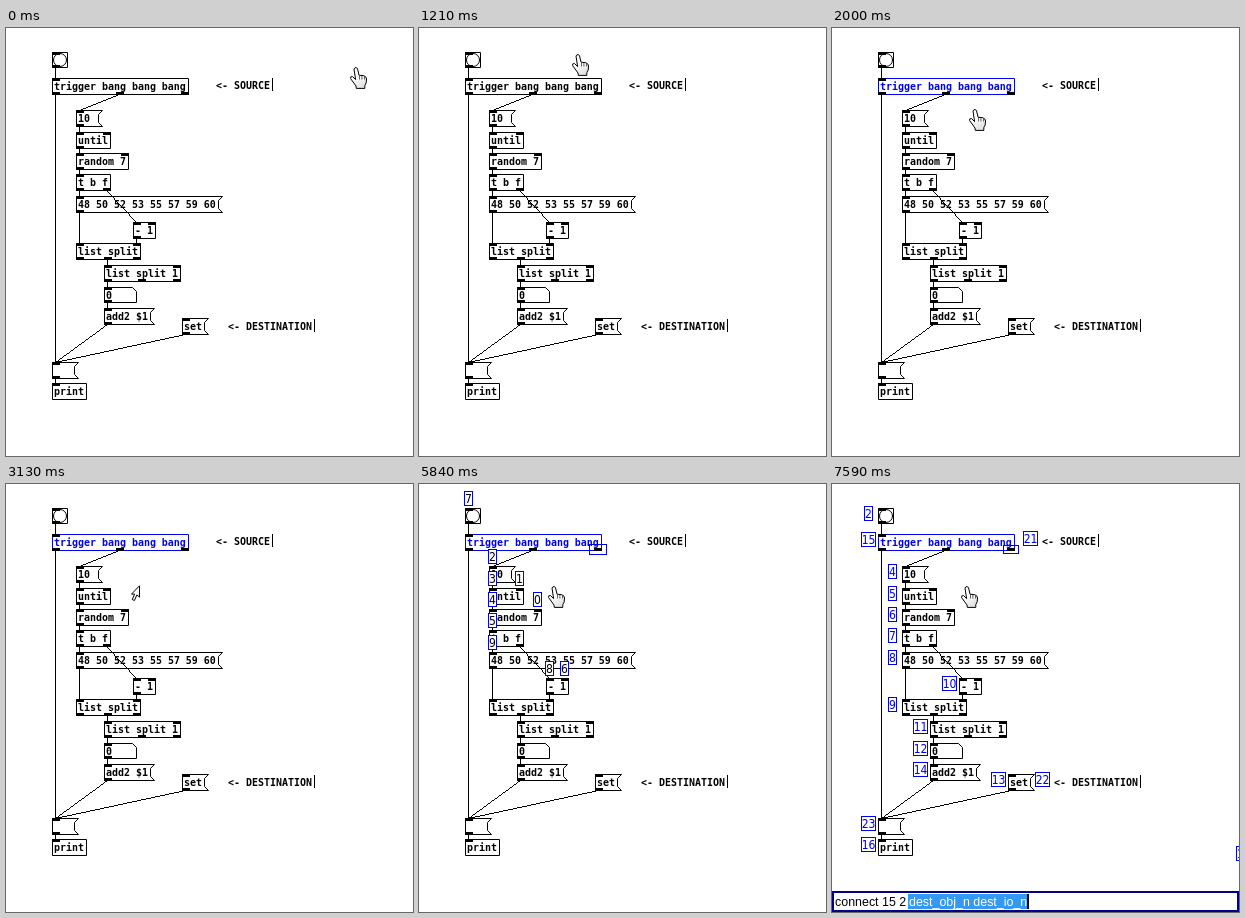
These frames come from a looping animation (407x428 px, 8 s). An HTML page with a canvas:

```html
<!DOCTYPE html>
<html lang="en">
<head>
<meta charset="utf-8">
<title>Patch editor</title>
<style>
html, body { margin: 0; width: 407px; height: 428px; overflow: hidden; background: #fff; }
canvas { display: block; }
</style>
</head>
<body>
<canvas id="stage" width="407" height="428"></canvas>
<script>
const ctx = document.getElementById('stage').getContext('2d');
const LOOP = 8000;
const BLUE = '#0000f0';
const MONO = 'bold 9.967px "DejaVu Sans Mono", monospace';
const TAG = '12px "DejaVu Sans Condensed", "Open Sans", sans-serif';
const BAR = '12.45px "Liberation Sans", Arial, sans-serif';

const boxes = {};
const wires = [];
const comments = [];

// The last character tells the kind: "(" message, "]" number, "@" button.
function makeBox(id, x, y, label) {
  const kind = { '(': 'msg', ']': 'num', '@': 'bang' }[label.slice(-1)] || 'obj';
  const text = kind === 'obj' ? label : label.slice(0, -1);
  const w = {
    bang: 15, num: 32,
    obj: 6 * text.length + 4,
    msg: 6 * Math.max(text.length, 3) + 8
  }[kind];
  const h = kind === 'bang' || kind === 'num' ? 15 : 16;
  const words = text.split(' ');
  const outs = { trigger: words.length - 1, t: words.length - 1, list: 3, print: 0 }[words[0]];
  const ins = ['until', 'random', '-', 'list'].includes(words[0]) ? 2 : 1;
  boxes[id] = { id, kind, text, x, y, w, h, ins, outs: outs === undefined ? 1 : outs };
}

function stack(id, x, y, step, ...labels) {
  labels.forEach((label, i) => makeBox(id + i, x, Math.round(y + i * step), label));
}

function wire(from, outlet, to, inlet) {
  wires.push([boxes[from], outlet, boxes[to], inlet]);
}

function chain(...ids) {
  ids.slice(1).forEach((id, i) => wire(ids[i], 0, id, 0));
}

stack(2, 46, 24, 0, '@');
stack(4, 70, 82.1, 21.45, '10(', 'until', 'random 7', 't b f', '48 50 52 53 55 57 59 60(');
stack(9, 70, 215, 0, 'list split');
stack(10, 127, 194, 0, '- 1');
stack(11, 98, 237, 21.6, 'list split 1', '0]');
stack(13, 176, 290, 0, 'set(');
stack(14, 98, 280, 0, 'add2 $1(');
stack(15, 46, 50, 0, 'trigger bang bang bang');
stack(16, 46, 355, 0, 'print');
stack(23, 46, 334, 0, '(');
comments.push({ id: 21, x: 210, y: 61, text: '<- SOURCE' });
comments.push({ id: 22, x: 222, y: 302, text: '<- DESTINATION' });

chain(2, 15, 23, 16);
chain(4, 5, 6, 7, 8, 9);
chain(11, 12, 14, 23);
chain(13, 23);
wire(15, 1, 4, 0);
wire(7, 1, 10, 0);
wire(10, 0, 9, 1);
wire(9, 1, 11, 0);

const all = Object.values(boxes);
const trigger = boxes[15];

// time, x, y of the pointer's top left corner
const path = [
  [460, 344, 39], [790, 226, 22], [1205, 153, 26], [1290, 135, 29],
  [1600, 136, 53], [1750, 136, 54], [2000, 137, 81]
];

const between = (t, a, b) => t >= a && t < b;

function portX(box, i, count) {
  return box.x + (count > 1 ? Math.floor((box.w - 7) * i / (count - 1)) : 0);
}

function poly(points, fill, stroke) {
  ctx.beginPath();
  points.forEach(([x, y]) => ctx.lineTo(x, y));
  ctx.closePath();
  ctx.fillStyle = fill;
  ctx.fill();
  ctx.strokeStyle = stroke;
  ctx.stroke();
}

// Hard-edged line, one pixel wide
function crispLine(x1, y1, x2, y2) {
  const n = Math.max(Math.abs(x2 - x1), Math.abs(y2 - y1));
  for (let i = 0; i <= n; i++) {
    ctx.fillRect(Math.round(x1 + (x2 - x1) * i / n), Math.round(y1 + (y2 - y1) * i / n), 1, 1);
  }
}

function write(text, x, y, font, color) {
  ctx.font = font;
  ctx.fillStyle = color;
  ctx.fillText(text, x, y);
}

function drawBox(box, color) {
  const l = box.x + 0.5, t = box.y + 0.5, r = l + box.w, b = t + box.h;
  const shapes = {
    msg: [[l, t], [r, t], [r - 4, t + 4], [r - 4, b - 4], [r, b], [l, b]],
    num: [[l, t], [r - 4, t], [r, t + 4], [r, b], [l, b]]
  };
  poly(shapes[box.kind] || [[l, t], [r, t], [r, b], [l, b]], '#fff', color);
  if (box.kind === 'bang') {
    ctx.beginPath();
    ctx.arc(l + 7.5, t + 7.5, 6.5, 0, Math.PI * 2);
    ctx.stroke();
  }
  write(box.text, box.x + 2, box.y + 12, MONO, color);
  ctx.fillStyle = '#000';
  for (let i = 0; i < box.ins; i++) ctx.fillRect(portX(box, i, box.ins), box.y, 8, 3);
  for (let i = 0; i < box.outs; i++) ctx.fillRect(portX(box, i, box.outs), box.y + box.h - 2, 8, 3);
}

function drawComment({ text, x, y }) {
  write(text, x, y, MONO, '#000');
  ctx.fillRect(x + text.length * 6 + 2, y - 11, 1, 13);
}

function drawWire([from, o, to, i]) {
  crispLine(portX(from, o, from.outs) + 3, from.y + from.h, portX(to, i, to.ins) + 3, to.y);
}

function drawTag(n, cx, cy, color) {
  const w = n > 9 ? 14 : 8;
  ctx.fillStyle = '#fff';
  ctx.strokeStyle = BLUE;
  ctx.fillRect(cx - w / 2, cy - 7, w, 14);
  ctx.strokeRect(cx - w / 2, cy - 7, w, 14);
  ctx.textAlign = 'center';
  write(n, cx, cy + 4.5, TAG, color);
  ctx.textAlign = 'left';
}

function drawOutletMark(t) {
  if (t < 3250) return;
  const i = t < 3960 ? 0 : t < 4460 ? 1 : 2;
  const grow = between(t, 5460, 6630) ? 1 : 0;
  ctx.strokeStyle = BLUE;
  ctx.strokeRect(portX(trigger, i, 3) - 3.5 - grow, 61.5 - grow, 15 + 2 * grow, 8 + 2 * grow);
}

function drawInletTags() {
  const digits = [...'7231405986'];
  all.filter(b => b.y < 200 && b !== trigger).forEach(b => {
    for (let i = 0; i < b.ins; i++) {
      drawTag(digits.shift(), portX(b, i, b.ins) + 3.5, b.y - 9.5, '#000');
    }
  });
}

function drawBoxTags() {
  all.forEach(b => drawTag(b.id, b.x - 9.5, b.y + 5.5, BLUE));
  comments.forEach(c => drawTag(c.id, c.x - 11.5, c.y - 6.5, BLUE));
  drawTag(17, 411.5, 369.5, BLUE);
}

function drawBar(t) {
  ctx.fillStyle = '#00008c';
  ctx.fillRect(0, 407, 407, 21);
  ctx.fillStyle = '#fff';
  ctx.fillRect(2, 409, 403, 17);
  ctx.fillStyle = '#3399f5';
  ctx.fillRect(76, 410, 119, 15);
  write('connect 15 2', 3, 422, BAR, '#000');
  write('dest_obj_n dest_io_n', 77, 422, BAR, '#fff');
  if (!between(t, 7290, 7590)) {
    ctx.fillStyle = '#000';
    ctx.fillRect(195, 410, 2, 15);
  }
}

function pointerAt(t) {
  if (t >= 2590) return [129, 102];
  if (t >= 2380) return [132, 101];
  if (t < 500) return [344, 39];
  // the pointer is redrawn in small steps
  const s = t < 1340
    ? 500 + 41.5 * Math.min(19, Math.floor((t - 500) / 41.5 + 0.1))
    : 1340 + 55 * Math.floor((t - 1340) / 55);
  const k = path.findIndex(p => p[0] >= s);
  if (k < 0) return path[path.length - 1].slice(1);
  const a = path[k - 1], b = path[k], f = (s - a[0]) / (b[0] - a[0]);
  return [1, 2].map(i => Math.round(a[i] + (b[i] - a[i]) * f));
}

function drawHand(x, y) {
  ctx.save();
  ctx.translate(x, y);
  const shade = ctx.createLinearGradient(3, 3, 15, 21);
  shade.addColorStop(0.3, '#fff');
  shade.addColorStop(1, '#dcdcdc');
  ctx.lineJoin = 'round';
  poly([
    [4, 2], [5, 0.7], [6.6, 0.7], [7.6, 2], [9, 8.2], [13.8, 8.7], [16, 10.2],
    [16.5, 12], [16.2, 16], [14.8, 18.5], [14.8, 21.4], [6.3, 21.4], [6, 19],
    [0.6, 11.6], [0.8, 9.8], [2.6, 9.6], [5.6, 12.6]
  ], shade, '#000');
  ctx.fillStyle = '#444';
  for (let i = 0; i < 3; i++) ctx.fillRect(9 + 2.5 * i, 9, 0.8, 3.5);
  ctx.restore();
}

function drawArrow() {
  poly([
    [133.5, 101.8], [133.5, 113.2], [130.9, 110.9], [128.4, 116.5],
    [126.2, 115.5], [128.7, 110.1], [125.5, 110.1]
  ], '#fff', '#000');
}

function drawPointer(t) {
  const arrow = between(t, 3130, 4880) || between(t, 5340, 5840) || between(t, 6630, 7380);
  if (arrow) drawArrow();
  else drawHand(...pointerAt(t));
}

function draw(t) {
  ctx.fillStyle = '#fff';
  ctx.fillRect(0, 0, 407, 428);
  all.forEach(b => drawBox(b, b === trigger && t >= 1670 ? BLUE : '#000'));
  comments.forEach(drawComment);
  ctx.fillStyle = '#000';
  wires.forEach(drawWire);
  drawOutletMark(t);
  if (between(t, 5460, 6630)) drawInletTags();
  if (t >= 6630) drawBoxTags();
  if (t >= 6670) drawBar(t);
  drawPointer(t);
}

const start = performance.now();
function tick() {
  draw((performance.now() - start) % LOOP);
  requestAnimationFrame(tick);
}
tick();
</script>
</body>
</html>
```
